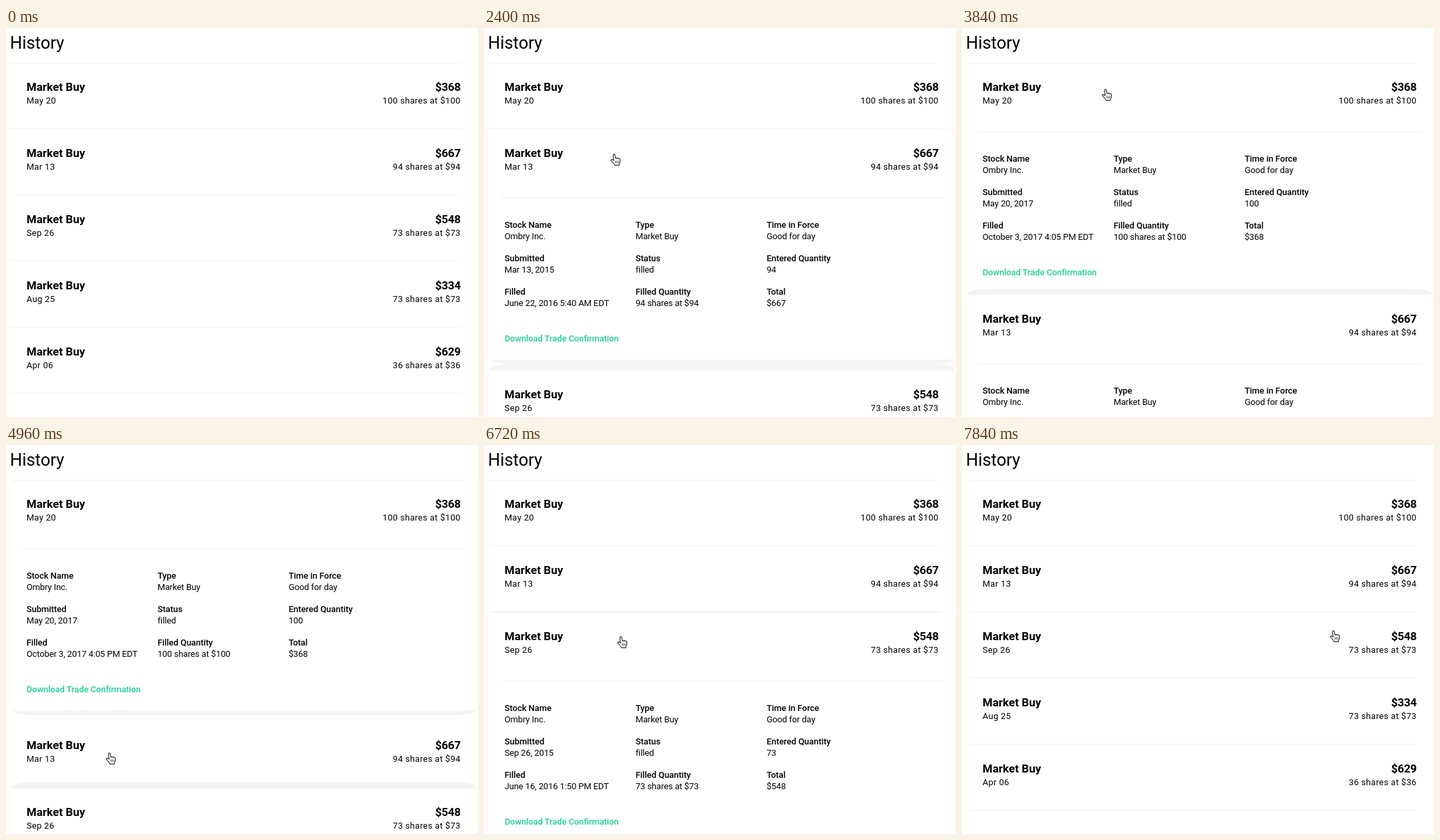
An HTML page for the animation above (8 s loop, 706 by 582 pixels).

```html
<!DOCTYPE html>
<html lang="en">
<head>
<meta charset="utf-8">
<title>History</title>
<style>
  html, body { margin: 0; width: 100%; height: 100%; overflow: hidden; background: #fff; }
  svg { display: block; font-family: Roboto, "Open Sans", sans-serif; }
  .heading { font-size: 25.5px; }
  .title { font-size: 17px; font-weight: 600; letter-spacing: .05px; }
  .sub { font-size: 13px; letter-spacing: .32px; }
  .price { letter-spacing: -.25px; }
  .label { font-size: 13px; font-weight: 500; letter-spacing: -.05px; }
  .value { font-size: 13px; letter-spacing: -.12px; }
  .link { font-size: 13px; font-weight: 500; letter-spacing: -.1px; fill: #21ce99; }
  .link.hover { fill: #1ab585; }
  .end { text-anchor: end; }
  .rule { fill: #f3f3f3; }
  .band { fill: #f4f4f4; }
  .edge { fill: none; stroke: #f6f6f6; }
</style>
</head>
<body>
<svg id="stage" width="706" height="582" viewBox="0 0 706 582"></svg>
<script>
const LOOP = 8000, STEP = 160, SLIDE = 240;
const TOP = 52, CLOSED = 99, EXTRA = 262, CARD = 346, LEFT = 30.7, RIGHT = 680;

// opens and closes are click times in ms
const trades = [
  { date: 'May 20', year: 2017, qty: 100, total: 368, filled: 'October 3, 2017 4:05 PM EDT', opens: 3690, closes: 5770 },
  { date: 'Mar 13', year: 2015, qty: 94, total: 667, filled: 'June 22, 2016 5:40 AM EDT', opens: 2090, closes: 4758 },
  { date: 'Sep 26', year: 2015, qty: 73, total: 548, filled: 'June 16, 2016 1:50 PM EDT', opens: 970, closes: 7210 },
  { date: 'Aug 25', qty: 73, total: 334 },
  { date: 'Apr 06', qty: 36, total: 629 }
];

// the pointer glides to (x, y) between two times and rests there
const glides = [
  { from: 0, to: 160, x: 212, y: 284 },
  { from: 160, to: 640, x: 212, y: 302 },
  { from: 800, to: 1120, x: 102, y: 294 },
  { from: 1440, to: 2080, x: 189, y: 188 },
  { from: 2720, to: 3040, x: 150, y: 452 },
  { from: 3040, to: 3520, x: 209, y: 91 },
  { from: 4160, to: 4960, x: 149, y: 460 },
  { from: 5120, to: 5600, x: 201, y: 80 },
  { from: 6240, to: 6720, x: 199, y: 286 },
  { from: 7200, to: 7840, x: 550, y: 277 }
];

const clamp = u => Math.min(1, Math.max(0, u));
const easeOut = u => 1 - (1 - clamp(u)) ** 3;
const easeInOut = u => (1 - Math.cos(Math.PI * clamp(u))) / 2;

const stage = document.getElementById('stage');

function add(parent, tag, attrs = {}, text = '') {
  const el = document.createElementNS('http://www.w3.org/2000/svg', tag);
  for (const key in attrs) el.setAttribute(key, attrs[key]);
  el.textContent = text;
  return parent.appendChild(el);
}
const write = (parent, kind, x, y, text) => add(parent, 'text', { class: kind, x, y }, text);
const rule = (parent, x, y, width) => add(parent, 'rect', { class: 'rule', x, y, width, height: 1 });
const show = (el, on) => { el.style.display = on ? '' : 'none'; };

function buildDetails(row, trade) {
  const group = add(row, 'g');
  const cells = [
    ['Stock Name', 'Ombry Inc.'], ['Type', 'Market Buy'], ['Time in Force', 'Good for day'],
    ['Submitted', `${trade.date}, ${trade.year}`], ['Status', 'filled'], ['Entered Quantity', trade.qty],
    ['Filled', trade.filled], ['Filled Quantity', `${trade.qty} shares at $${trade.qty}`], ['Total', `$${trade.total}`]
  ];
  rule(group, 24, 103, 664);
  cells.forEach(([label, value], i) => {
    const x = LEFT + 196 * (i % 3), y = 148 + 50 * Math.floor(i / 3);
    write(group, 'label', x, y, label);
    write(group, 'value', x, y + 17, value);
  });
  return group;
}

function buildRow(trade) {
  const group = add(stage, 'g');
  const paper = add(group, 'rect', { width: 706, fill: '#fff' });
  const card = add(group, 'g');
  add(card, 'rect', { class: 'edge', x: 5.5, y: .5, width: 700, height: CARD - 1, rx: 10 });
  add(card, 'path', { class: 'band', d: `M8 ${CARD}H704Q694 ${CARD + 6} 670 ${CARD + 6}H42Q18 ${CARD + 6} 8 ${CARD}Z` });
  const topBand = add(group, 'path', { class: 'band', d: 'M8 0Q10 -9 42 -9H670Q702 -9 704 0Z' });
  const border = rule(group, 7, CLOSED - 1, 673);
  write(group, 'title', LEFT, 42, 'Market Buy');
  write(group, 'sub', LEFT, 61, trade.date);
  write(group, 'title price end', RIGHT, 42, `$${trade.total}`);
  write(group, 'sub end', RIGHT, 61, `${trade.qty} shares at $${trade.qty}`);
  const details = buildDetails(group, trade);
  const link = write(details, 'link', LEFT, 318, 'Download Trade Confirmation');
  return { trade, group, paper, card, topBand, border, details, link };
}

function buildPointer() {
  const group = add(stage, 'g', { stroke: '#333', 'stroke-linejoin': 'round', 'stroke-linecap': 'round' });
  add(group, 'path', {
    fill: '#fff', 'stroke-width': 1.2,
    d: 'M5.2 10L4.2 3Q4 1 5.4.8Q6.8.8 7 2.6L7.8 7Q9.4 5.6 10 7.2Q11.6 6 12.2 7.6Q14.4 6.8 14.6 9V12Q14.4 14.5 13 15.5V17.4H6.5Q5.5 14.5 1.2 10.6Q.4 8.6 2.4 8.6Q3.8 8.8 5.2 10Z'
  });
  add(group, 'path', { fill: 'none', 'stroke-width': .9, d: 'M7.8 11V14M10 11V14M12.2 11V14' });
  return group;
}

function openness({ opens, closes }, time) {
  if (!opens) return 0;
  return easeOut((time - opens) / SLIDE) - easeOut((time - closes) / SLIDE);
}

function pointerAt(time) {
  let { x, y } = glides[0];
  for (const glide of glides) {
    const part = easeInOut((time - glide.from) / (glide.to - glide.from));
    x += (glide.x - x) * part;
    y += (glide.y - y) * part;
  }
  return { x: Math.round(x), y: Math.round(y) };
}

const rows = trades.map(buildRow);
write(stage, 'heading', 6, 31, 'History');
rule(stage, 7, TOP, 673);
const pointer = buildPointer();

function draw(time) {
  const hand = pointerAt(time);
  show(pointer, time >= glides[0].to);
  pointer.setAttribute('transform', `translate(${hand.x} ${hand.y})`);

  let y = TOP, openAbove = false;
  for (const row of rows) {
    const open = openness(row.trade, time);
    const height = CLOSED + Math.round(EXTRA * open);
    const linkY = hand.y - y - 318;
    const onLink = hand.x < 197 && linkY > -20 && linkY < 4;
    row.group.setAttribute('transform', `translate(0 ${y})`);
    row.paper.setAttribute('height', height);
    show(row.card, open === 1);
    show(row.topBand, open === 1 && openAbove);
    show(row.border, open < .01);
    show(row.details, open > .01);
    row.link.classList.toggle('hover', onLink);
    openAbove = openAbove || open > 0;
    y += height;
  }
}

const start = performance.now();
function tick() {
  const time = (performance.now() - start) % LOOP;
  draw(Math.floor(time / STEP) * STEP);
  requestAnimationFrame(tick);
}
tick();
</script>
</body>
</html>
```
